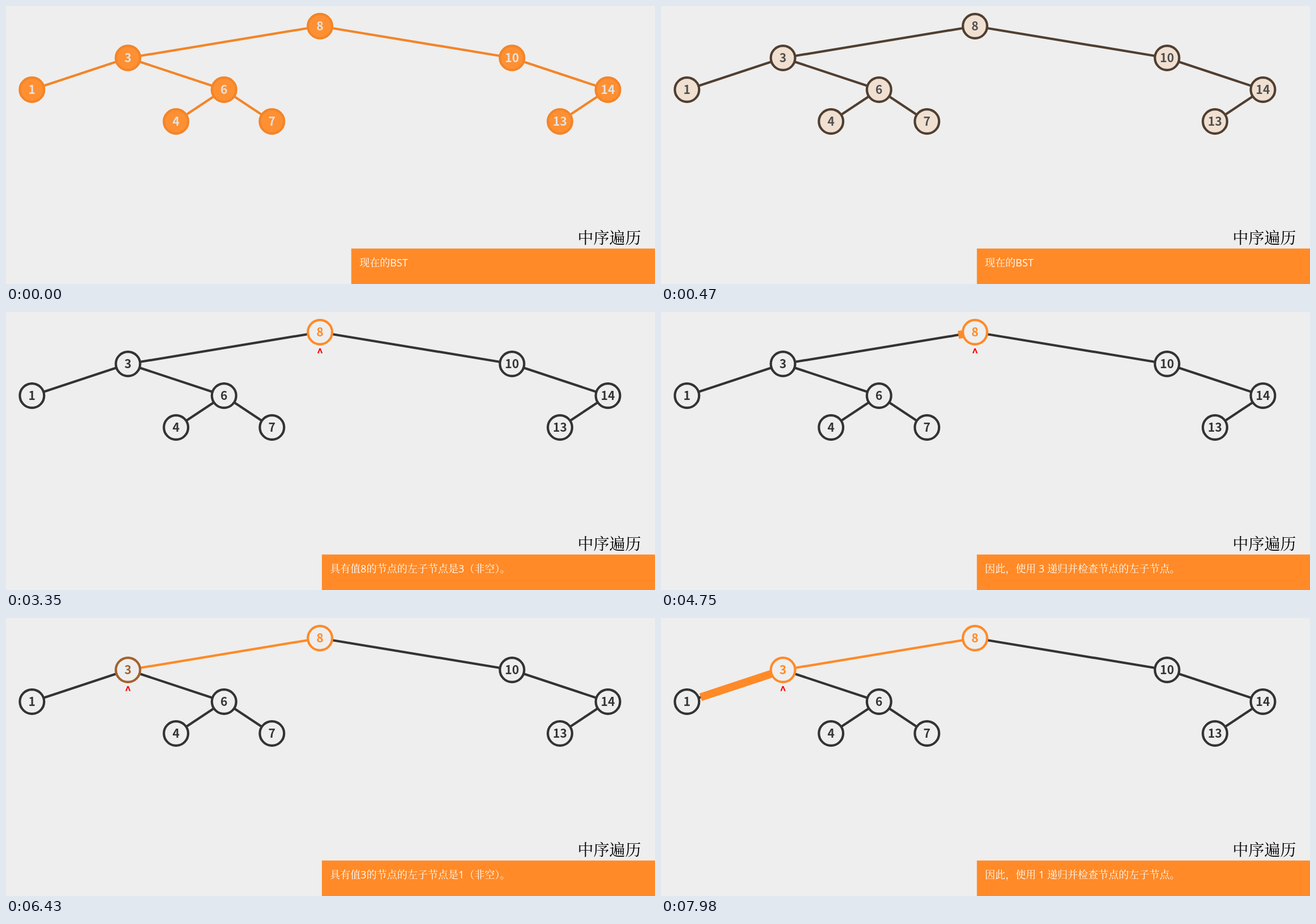
Write an HTML page that moves like this. It is 1144 px wide and 490 px high and loops after 8 s.

```html
<!DOCTYPE html>
<html lang="zh-CN">
<head>
<meta charset="utf-8">
<title>中序遍历</title>
<style>
html, body { margin: 0; width: 100%; height: 100%; overflow: hidden; background: #eee; }
svg { display: block; width: 1144px; height: 490px; }
.node circle { stroke-width: 4.2; }
.node text, .tag { font: 700 21px "Noto Sans CJK SC", "Noto Sans", sans-serif; text-anchor: middle; }
.tag { font-size: 19.5px; fill: #f00; }
.title, .note { font-family: "Open Sans", "Noto Serif CJK SC", "Noto Sans CJK SC", serif; }
.title { font-size: 28px; font-weight: 300; }
.note { font-size: 18px; fill: #fff; white-space: pre; }
</style>
</head>
<body>
<svg id="stage" viewBox="0 0 1144 490"></svg>
<script>
const LOOP = 8000, FADE = 1100;
const ORANGE = [255, 138, 39], DARK = [51, 51, 51], LIGHT = [238, 238, 238];

const nodes = {
  8: [553.5, 35.5], 3: [215, 91.5], 10: [892, 91.5],
  1: [45.8, 147.5], 6: [384.3, 147.5], 14: [1061, 147.5],
  4: [299.7, 203.5], 7: [468.8, 203.5], 13: [976.5, 203.5]
};
const edges = [[8, 3], [8, 10], [3, 1], [3, 6], [10, 14], [6, 4], [6, 7], [14, 13]];

// start, message, tag, tagged node
const steps = [
  [0, '现在的BST', '', 8],
  [900, '根，8 不是null。', 'root', 8],
  [2140, '因此，检查8的左子节点。', 'root', 8],
  [3350, '具有值8的节点的左子节点是3（非空）。', '^', 8],
  [4540, '因此，使用 3 递归并检查节点的左子节点。', '^', 8],
  [5810, '具有值3的节点的左子节点是1（非空）。', '^', 3],
  [7050, '因此，使用 1 递归并检查节点的左子节点。', '^', 3]
];
const visits = { 8: 960, 3: 5865 };
const walks = [{ from: 8, to: 3, at: 4550 }, { from: 3, to: 1, at: 7075 }];

const clamp = x => Math.min(1, Math.max(0, x));
const cubic = x => x < 0.5 ? 4 * x ** 3 : 1 - 4 * (1 - x) ** 3;
const ease = (t, start) => cubic(clamp((t - start) / FADE));
const mix = (a, b, k) => `rgb(${a.map((v, i) => Math.round(v + (b[i] - v) * k))})`;

function set(el, attrs) {
  for (const key in attrs) el.setAttribute(key, attrs[key]);
  return el;
}
function add(parent, tag, attrs, text = '') {
  const el = set(document.createElementNS('http://www.w3.org/2000/svg', tag), attrs);
  el.textContent = text;
  return parent.appendChild(el);
}

const stage = document.getElementById('stage');
add(stage, 'rect', { width: 1144, height: 490, fill: '#eee' });

const lines = edges.map(([a, b]) => {
  const [x1, y1] = nodes[a], [x2, y2] = nodes[b];
  return add(stage, 'line', { x1, y1, x2, y2, 'stroke-width': 4.2 });
});

for (const w of walks) {
  const [ax, ay] = nodes[w.from], [bx, by] = nodes[w.to];
  const len = Math.hypot(bx - ax, by - ay);
  const ux = (bx - ax) / len, uy = (by - ay) / len, gap = 22.4;
  w.point = k => {
    const d = gap + (len - 2 * gap) * k;
    return [ax + ux * d, ay + uy * d];
  };
  const [x1, y1] = w.point(0);
  w.el = add(stage, 'line', { x1, y1, stroke: mix(ORANGE, ORANGE, 0), 'stroke-width': 14 });
  w.edge = edges.findIndex(([a, b]) => a === w.from && b === w.to);
}

const discs = Object.entries(nodes).map(([id, [x, y]]) => {
  const g = add(stage, 'g', { class: 'node' });
  return {
    id,
    ring: add(g, 'circle', { cx: x, cy: y, r: 21.4 }),
    label: add(g, 'text', { x, y: y + 7.7 }, id)
  };
});

const tag = add(stage, 'text', { class: 'tag' });
add(stage, 'text', { class: 'title', x: 1007.5, y: 419 }, '中序遍历');
const panel = add(stage, 'g', {});
add(panel, 'rect', { y: 427.5, width: 700, height: 63, fill: mix(ORANGE, ORANGE, 0) });
const note = add(panel, 'text', { class: 'note', x: 14.3, y: 459 });

function draw(t) {
  const calm = ease(t, -267);
  const base = mix(ORANGE, DARK, calm);

  for (const { id, ring, label } of discs) {
    const seen = t >= visits[id];
    const k = seen ? ease(t, visits[id]) : 0;
    const lit = mix(DARK, ORANGE, k);
    set(ring, { fill: mix(ORANGE, LIGHT, calm), stroke: seen ? lit : base });
    set(label, { fill: seen ? lit : mix(LIGHT, DARK, calm) });
  }

  lines.forEach(line => set(line, { stroke: base }));
  for (const w of walks) {
    const done = t >= w.at + FADE;
    const k = ease(t, w.at);
    const [x2, y2] = w.point(k);
    set(w.el, { x2, y2, visibility: k > 0 && !done ? 'visible' : 'hidden' });
    if (done) set(lines[w.edge], { stroke: mix(ORANGE, ORANGE, 0) });
  }

  const [, message, mark, at] = steps.filter(s => s[0] <= t).pop();
  if (note.textContent !== message) note.textContent = message;
  if (tag.textContent !== mark) tag.textContent = mark;
  set(tag, { x: nodes[at][0], y: nodes[at][1] + 43.3 });

  // the panel slides in from the right edge
  const slide = 0.5 - Math.cos(Math.PI * clamp((t + 403) / 500)) / 2;
  set(panel, { transform: `translate(${(1144 - 587.2 * slide).toFixed(2)} 0)` });
}

function tick() {
  draw(performance.now() % LOOP);
  requestAnimationFrame(tick);
}
tick();
</script>
</body>
</html>
```
